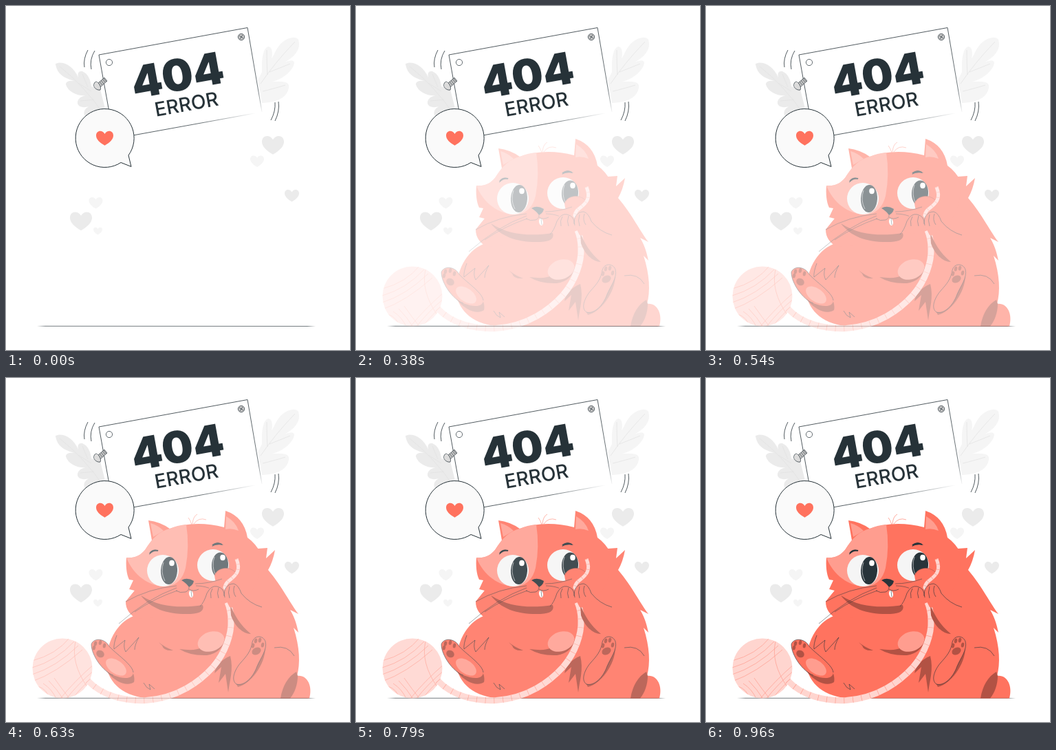
Write an HTML page with a canvas that moves like this. It is 500 px wide and 500 px high and loops after 1000 ms.

```html
<!DOCTYPE html>
<html lang="en">
<head>
<meta charset="utf-8">
<title>404 error</title>
<style>
html, body { margin: 0; width: 100%; height: 100%; overflow: hidden; background: #fff; }
canvas { display: block; width: 500px; height: 500px; }
</style>
</head>
<body>
<canvas id="stage" width="500" height="500"></canvas>
<script>
const SIZE = 500, LOOP = 1000, FPS = 24, FIRST_STEP = 5;
const INK = '#263238', CORAL = '#ff725e', LIGHT = '#ff9c8e', SHADE = '#b25042', YARN = '#ffd5cf';
const FONT = 'Montserrat, Inter, sans-serif';

const stage = document.getElementById('stage').getContext('2d');
const scene = layer(), cat = layer();
let g;

function layer() {
  const c = document.createElement('canvas');
  c.width = c.height = SIZE;
  return c.getContext('2d');
}

function fill(d, color) {
  g.fillStyle = color;
  g.fill(new Path2D(d));
}

function line(d, width = 0.7, color = INK) {
  g.lineWidth = width;
  g.strokeStyle = color;
  g.stroke(new Path2D(d));
}

function oval(x, y, rx, ry, color, angle = 0) {
  g.beginPath();
  g.ellipse(x, y, rx, ry, angle, 0, Math.PI * 2);
  g.fillStyle = color;
  g.fill();
}

function heart(x, y, w, color) {
  g.save();
  g.translate(x, y);
  g.scale(w, w);
  fill('M0 .43C-.3 .26-.5 .06-.5-.15C-.5-.44-.15-.5 0-.24C.15-.5 .5-.44 .5-.15C.5 .06 .3 .26 0 .43Z', color);
  g.restore();
}

function label(text, x, y, font) {
  g.save();
  g.translate(x, y);
  g.rotate(-0.178);
  g.font = font + ' ' + FONT;
  g.textAlign = 'center';
  g.fillStyle = INK;
  g.fillText(text, 0, 0);
  g.restore();
}

function fade(x0, y0, x1, y1, stops) {
  const grad = g.createLinearGradient(x0, y0, x1, y1);
  stops.forEach(([at, a]) => grad.addColorStop(at, `rgba(38,50,56,${a})`));
  return grad;
}

function drawLeaves() {
  fill('M72 84C81 79 98 86 105 104C103 97 107 94 111 95C119 98 123 107 124 117L137 121L148 165L114 159C112 152 116 148 121 146C111 149 103 146 104 139C106 132 113 130 119 130C105 132 90 125 87 114C87 108 96 108 103 110C88 106 74 101 72 84Z', '#ebebeb');
  line('M78 88Q114 116 144 160M105 112L124 124M111 99L119 118M108 138L128 136', 0.6, '#e0e0e0');
  fill('M425 49C421 42 404 47 396 59C391 66 389 72 386 77C388 68 387 59 381 59C374 61 371 76 372 96L366 108L372 141C391 140 408 135 411 119C413 110 404 109 387 110C403 106 417 94 419 83C419 76 407 80 396 86C411 80 427 69 426 54Z', '#f5f5f5');
  line('M420 52Q391 82 370 113M379 64Q379 85 380 100M413 84Q393 92 383 96M406 115Q386 121 373 124', 0.6, '#dedede');
}

function drawSign() {
  fill('M135 71L351 31.5L372 154L157 193Z', '#fff');
  line('M157 193L135 71L351 31.5', 0.8);
  line('M351 31.5L372 154', 0.8, fade(351, 32, 372, 154, [[0, 1], [0.75, 0.8], [1, 0.05]]));
  line('M157 193L372 154', 0.8, fade(186, 188, 372, 154, [[0, 1], [0.5, 0.9], [0.95, 0]]));
  label('404', 253, 123, '900 64px');
  label('ERROR', 264, 152.5, '500 28.2px');

  oval(150, 82, 4.6, 4.6, '#fff');
  line('M145.4 82a4.6 4.6 0 1 0 9.2 0a4.6 4.6 0 1 0-9.2 0', 0.7);
  oval(342, 45, 4.7, 4.7, '#c7c7c7');
  line('M337.3 45a4.7 4.7 0 1 0 9.4 0a4.7 4.7 0 1 0-9.4 0M339 43L345 47M340 48L344 42', 0.7);

  fill('M134 112L143 104L147 109L137 118Z', '#c7c7c7');
  line('M134 112L143 104L147 109L137 118M136 110L140 115M138 108L142 113M140 106L144 111M142 105L146 110', 0.6);
  oval(133, 117, 3.6, 6.6, '#dbdbdb', -0.6);
  line('M128 113C126 117 131 123 137 122C139 118 135 111 131 110Q128 111 128 113', 0.7);

  line('M119 64Q112 77 114 89M129 65Q121 78 124 92M391 140Q392 153 385 166M396 139Q398 153 391 167', 0.8);
}

function drawBubble() {
  const d = 'M167 227.5A42.5 42.5 0 1 1 178 217L182 233.5Z';
  fill(d, '#fafafa');
  line(d, 1);
  heart(143.5, 192, 25, CORAL);
}

function drawScene() {
  g = scene;
  fill('M0 0H500V500H0Z', '#fff');
  drawLeaves();
  drawSign();
  drawBubble();
  heart(388, 202, 32, '#ebebeb');
  heart(365, 225.5, 20, '#f5f5f5');
  heart(415.5, 275.5, 21, '#ebebeb');
  heart(109, 312.5, 32, '#ebebeb');
  heart(130.5, 286, 20, '#f5f5f5');
  heart(133.5, 327, 13, '#f5f5f5');
  line('M45 465.3L450 465.5', 0.8, fade(45, 0, 450, 0, [[0, 0], [0.03, 0.8], [0.97, 0.8], [1, 0]]));
}

function drawBody() {
  // torso and tail
  fill('M190 344C163 353 148 379 145 412C147 440 166 461 204 465.5H441C446 448 438 431 423 433C428 415 427 391 418 363L425 370C422 356 419 347 413 337L425 343C414 329 402 304 381 279Q388 267 391 250L378 262L380 247L366 248L300 300Z', CORAL);
  fill('M422 427C410 434 402 447 399 465.5H413C420 457 424 445 424 433Z', SHADE);
  line('M390 392Q410 388 419 404', 0.6);

  // belly
  fill('M222 384Q230 391 243 396Q229 397 227 389Z', SHADE);
  fill('M252 394Q275 397 284 392Q303 394 318 380Q313 400 292 403Q268 404 252 394Z', SHADE);
  oval(298, 383, 20, 14, LIGHT, -0.35);
  fill('M326 404C312 410 305 418 303 429L313 420L309 443L319 430L323 457C325 440 331 424 326 404Z', SHADE);
  line('M161 374Q156 387 157 394L173 381Q170 391 174 398L193 377Q187 388 187 395M200 443Q204 451 210 453L208 445L216 452', 0.6);

  // left foot
  fill('M146 426C158 442 176 449 186 442C189 430 178 412 160 402Z', SHADE);
  fill('M124 387C127 378 141 378 148 387C152 396 184 415 185 428C184 439 169 437 156 432C141 427 124 403 124 387Z', CORAL);
  oval(160, 420, 17, 9.5, LIGHT, 0.62);
  line('M124 387C127 378 141 378 148 387C152 396 184 415 185 428M124 387C124 403 141 427 156 432', 0.6);
  oval(137, 401, 6, 5, SHADE, 0.5);
  [[128, 392], [130, 386], [137, 384.5], [143, 389]].forEach(([x, y]) => oval(x, y, 2.2, 3.5, SHADE, 0.2));
}

function drawBall() {
  oval(82, 422, 43.5, 43.5, YARN);
  g.save();
  g.beginPath();
  g.arc(82, 422, 43.5, 0, 7);
  g.clip();
  for (let i = 0; i < 4; i++) {
    line(`M38 ${411 + i * 10}Q73 ${402 + i * 9} ${93 + i * 6} ${377 + i * 6}`, 0.7, LIGHT);
    line(`M${78 + i * 9} 467Q${101 + i * 5} ${439 + i * 4} 128 ${416 + i * 9}`, 0.7, LIGHT);
    line(`M${46 + i * 8} ${448 - i * 4}Q${60 + i * 7} 452 ${64 + i * 10} 468`, 0.7, LIGHT);
  }
  line('M101 383Q94 414 118 449', 0.7, LIGHT);
  g.restore();
}

function strand(d, width, gap) {
  line(d, width, YARN);
  g.setLineDash([0.7, gap]);
  line(d, width, LIGHT);
  g.setLineDash([]);
}

function drawHead() {
  fill('M212 236L207 207Q224 209 238 219Q275 206 317 217L319 193Q346 202 351 232C359 238 363 243 367 249C377 285 358 327 318 337C270 350 218 343 190 319L174 325L187 309L179 307L185 294L179 293C175 285 174 272 175 261C188 262 195 258 202 250Z', CORAL);
  fill('M187 309L174 325Q174 341 190 350L270 345L240 320Z', CORAL);
  fill('M202 250Q217 224 238 219Q249 214 262 213Q267 245 261 276C257 292 248 301 235 303C210 305 185 287 175 261C188 262 195 258 202 250Z', LIGHT);
  fill('M214 231L210 211Q221 214 229 222Z', LIGHT);
  fill('M320 201Q334 209 338 222Q328 218 319 220Z', LIGHT);
  fill('M196 316C225 335 258 334 286 330Q290 342 268 343C235 344 211 336 196 316Z', SHADE);
  line('M270 213Q268 207 265 203M271 212Q272 201 278 198M273 212Q280 202 291 206', 0.6, CORAL);

  eye(228, 280, 23, 237, 280, 20);
  eye(301, 272, 23, 311, 272, 18.5);
  fill('M208 257Q211 247 222 251Q213 251 208 257Z', INK);
  fill('M299 245Q306 235 316 243Q306 241 299 245Z', INK);
  line('M209 255Q213 249 221 251M300 243Q307 238 314 242', 2);

  // muzzle
  fill('M303 287C308 274 329 273 335 285L333 304H306Z', CORAL);
  line('M303 287C308 274 325 274 333 282', 0.6, SHADE);
  oval(269, 314, 3, 5, '#fff', -0.2);
  line('M269 309L270 318M266 304Q266 309 261 311Q253 313 247 309M266 307Q272 311 280 307', 0.6);
  fill('M255 294Q263 289 273 295Q272 301 266 304Q262 298 255 294Z', INK);
  line('M248 302Q207 306 174 325M248 305Q206 320 164 357M249 309Q216 320 187 340M275 299Q294 299 314 292M276 302Q290 302 304 309', 0.5);
}

function eye(x, y, r, px, py, pr) {
  oval(x, y, r, r, '#f5f5f5');
  oval(px, py, 12, pr, INK, 0.05);
  line(`M${px - 8} ${py - 12}Q${px - 13} ${py + 2} ${px - 6} ${py + 15}`, 0.6, '#fff');
  oval(px + 4, py - 11, 3.8, 4.2, '#fff');
}

function drawArms() {
  fill('M326 330C332 344 340 359 356 372C344 372 332 360 327 345Z', SHADE);
  const left = 'M290 329C285 319 291 304 302 302C311 300 319 306 320 315C316 322 313 327 311 332';
  const right = 'M318 319C315 307 322 299 331 299C340 300 344 311 339 320C337 330 330 335 325 333';
  fill(left + 'Z', CORAL);
  fill(right + 'Z', CORAL);
  line('M282 332Q288 326 292 313Q298 301 307 303Q318 306 317 317M300 306Q296 312 298 320M309 305Q306 313 309 320', 0.6);
  line('M318 319C315 307 322 299 331 299Q338 301 342 313Q354 328 372 333M325 303Q322 312 325 320M332 302Q329 311 334 318', 0.6);
}

function drawRightFoot() {
  fill('M337 449C355 445 377 417 377 391L366 399L331 438Z', SHADE);
  const foot = 'M358 384C361 373 374 374 377 383C380 395 370 407 365 419C359 436 346 448 335 445C326 439 333 423 341 414C350 404 356 397 358 384Z';
  fill(foot, CORAL);
  line(foot, 0.6);
  oval(364, 397, 7, 5, SHADE, -0.5);
  [[359, 389], [363, 382], [369, 381], [373, 388]].forEach(([x, y]) => oval(x, y, 2.2, 3.6, SHADE, 0.2));
}

function drawCat() {
  g = cat;
  drawBody();
  drawHead();
  drawBall();
  strand('M119 440C140 462 172 470 204 468.5C250 465 282 441 301 420C319 399 328 372 327 352Q327 338 322 326', 9, 12);
  strand('M335 263C342 280 334 287 325 294Q316 300 318 312', 5, 7);
  drawArms();
  drawRightFoot();
}

function opacity(ms) {
  const step = Math.floor((ms + 4) * FPS / 1000);
  if (step < FIRST_STEP) return 0;
  const t = (step - 0.5) / FPS;
  return t * t * (3 - 2 * t);
}

const start = performance.now();

function render(now) {
  const ms = Math.max(0, now - start) % LOOP;
  stage.globalAlpha = 1;
  stage.drawImage(scene.canvas, 0, 0);
  stage.globalAlpha = opacity(ms);
  stage.drawImage(cat.canvas, 0, 0);
  requestAnimationFrame(render);
}

drawScene();
drawCat();
render(start);
</script>
</body>
</html>
```
